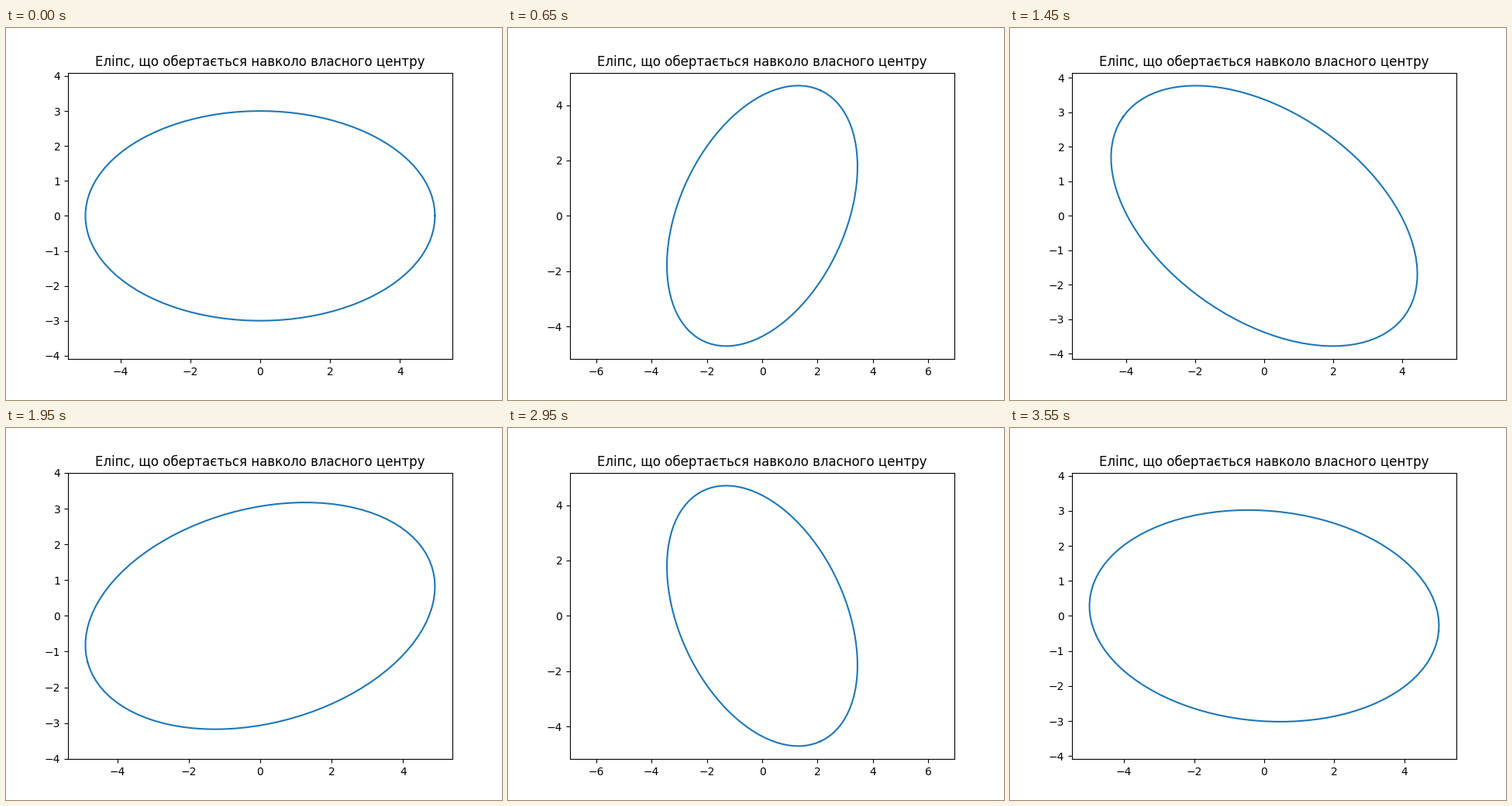
These frames come from a looping animation (640x480 px, 3.6 s). A matplotlib script:

```python
import numpy as np
import matplotlib.pyplot as plt
from matplotlib.animation import FuncAnimation

FRAMES = 72
INTERVAL = 50
A, B = 5, 3  # semi-axes

t = np.linspace(0, 2 * np.pi, 100)
x0, y0 = A * np.cos(t), B * np.sin(t)

fig, ax = plt.subplots(figsize=(6.4, 4.8), dpi=100)


def draw(frame):
    angle = 2 * np.pi * frame / FRAMES
    c, s = np.cos(angle), np.sin(angle)
    ax.clear()
    ax.plot(x0 * c - y0 * s, x0 * s + y0 * c)
    ax.set_title("Еліпс, що обертається навколо власного центру")
    # Limits follow the curve, with equal units on both axes
    ax.axis("equal")


anim = FuncAnimation(fig, draw, frames=FRAMES, interval=INTERVAL,
                     repeat=True, repeat_delay=0)
plt.show()
```
